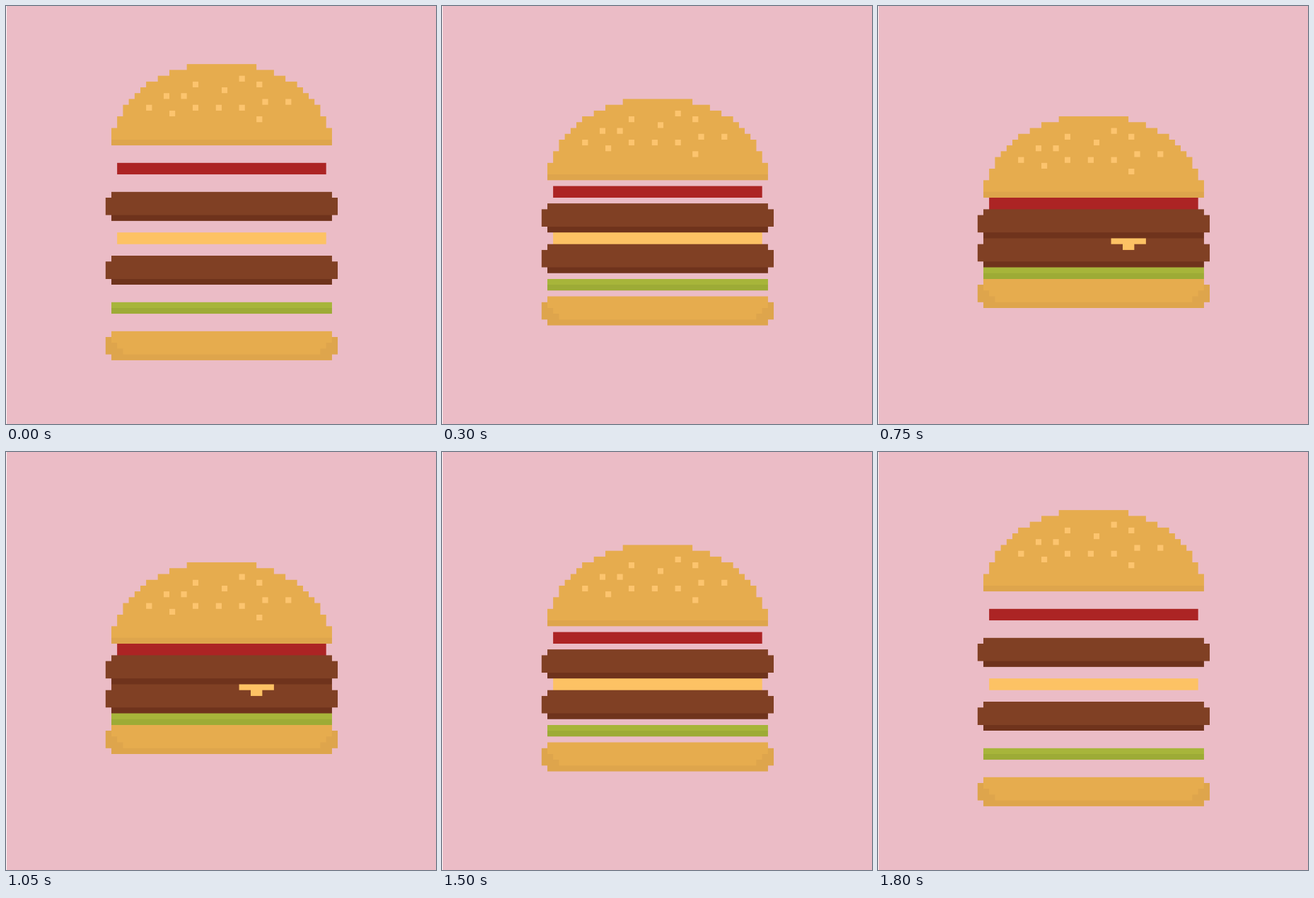
An HTML page with a canvas that plays this animation: 608 by 591 pixels, repeating every 1950 ms.

```html
<!DOCTYPE html>
<html lang="en">
<head>
<meta charset="utf-8">
<title>Pixel burger</title>
<style>
  html, body { margin: 0; width: 100%; height: 100%; overflow: hidden; background: #ebbcc6; }
  canvas { display: block; }
</style>
</head>
<body>
<canvas id="stage" width="608" height="591"></canvas>
<script>
const CELL = 8.208, LEFT = 1.2, TOP = 0.1;
const SHEET_CELL = 10, COLS = 74, ROWS = 72, CENTER = 37;
const STEP = 150, STEPS = 13, MIDDLE = 6;

const BUN = '#e6ac4e', BUN_SHADE = '#dea54c', SEED = '#fcc46e', CHEESE = '#fdc264';
const MEAT = '#804024', MEAT_SHADE = '#6f331c', TOMATO = '#ac2424';

const stage = document.getElementById('stage').getContext('2d');

// The burger is drawn on whole cells, then scaled so that its edges come out soft
const sheet = document.createElement('canvas');
sheet.width = COLS * SHEET_CELL;
sheet.height = ROWS * SHEET_CELL;
const pen = sheet.getContext('2d');
pen.scale(SHEET_CELL, SHEET_CELL);

function cells(color, col, row, width, height = 1) {
  pen.fillStyle = color;
  pen.fillRect(col, row, width, height);
}

function bar(color, half, row, height = 1) {
  cells(color, CENTER - half, row, half * 2, height);
}

function seeds(row) {
  const seed = (col, down) => cells(SEED, col, row + down, 1);
  for (let i = 0; i < 7; i++) {
    seed(24 + 4 * i, Math.round(7.4 - 0.2 * i + 0.35 * Math.sin(2 * i)));
  }
  for (const [col, down] of [[27, 5], [30, 5], [32, 3], [37, 4], [40, 2], [43, 3], [43, 9]]) {
    seed(col, down);
  }
}

function topBun(row) {
  for (let i = 0; i < 14; i++) {
    const rise = 0.95 - 0.07 * i;
    bar(BUN, Math.floor(19.5 * Math.sqrt(1 - rise * rise)), row + i);
  }
  bar(BUN_SHADE, 19, row + 13);
  seeds(row);
}

function patty(row) {
  bar(MEAT, 19, row, 4);
  bar(MEAT, 20, row + 1, 3);
  bar(MEAT_SHADE, 19, row + 4);
}

function lettuce(row) {
  bar('#a7b53a', 19, row);
  bar('#9dab36', 19, row + 1);
}

function bottomBun(row) {
  bar(BUN, 19, row);
  for (let i = 1; i < 4; i++) {
    bar(BUN_SHADE, 20, row + i);
    bar(BUN, 20 - i, row + i);
  }
  bar(BUN_SHADE, 19, row + 4);
}

function drip(length) {
  if (length > 0) cells(CHEESE, 40, 40, 6);
  if (length > 1) cells(CHEESE, 42, 41, 2, length - 1);
}

function draw(step) {
  const distance = Math.abs(step - MIDDLE);
  const gap = Math.max(0, distance - 3);

  pen.clearRect(0, 0, COLS, ROWS);
  bar(CHEESE, 18, 39, 2);
  topBun(19 - 3 * gap);
  bar(TOMATO, 18, 33 - 2 * gap, 2);
  patty(35 - gap);
  patty(40 + gap);
  lettuce(45 + 2 * gap);
  bottomBun(47 + 3 * gap);
  drip(3 - distance);

  stage.fillStyle = '#ebbcc6';
  stage.fillRect(0, 0, 608, 591);
  stage.fillStyle = '#fdf8f9';
  stage.fillRect(0, 0, 1, 591);
  stage.drawImage(sheet, LEFT, TOP, COLS * CELL, ROWS * CELL);
}

const start = performance.now();
function tick() {
  const elapsed = Math.max(0, performance.now() - start);
  draw(Math.floor(elapsed / STEP) % STEPS);
  requestAnimationFrame(tick);
}
tick();
</script>
</body>
</html>
```
